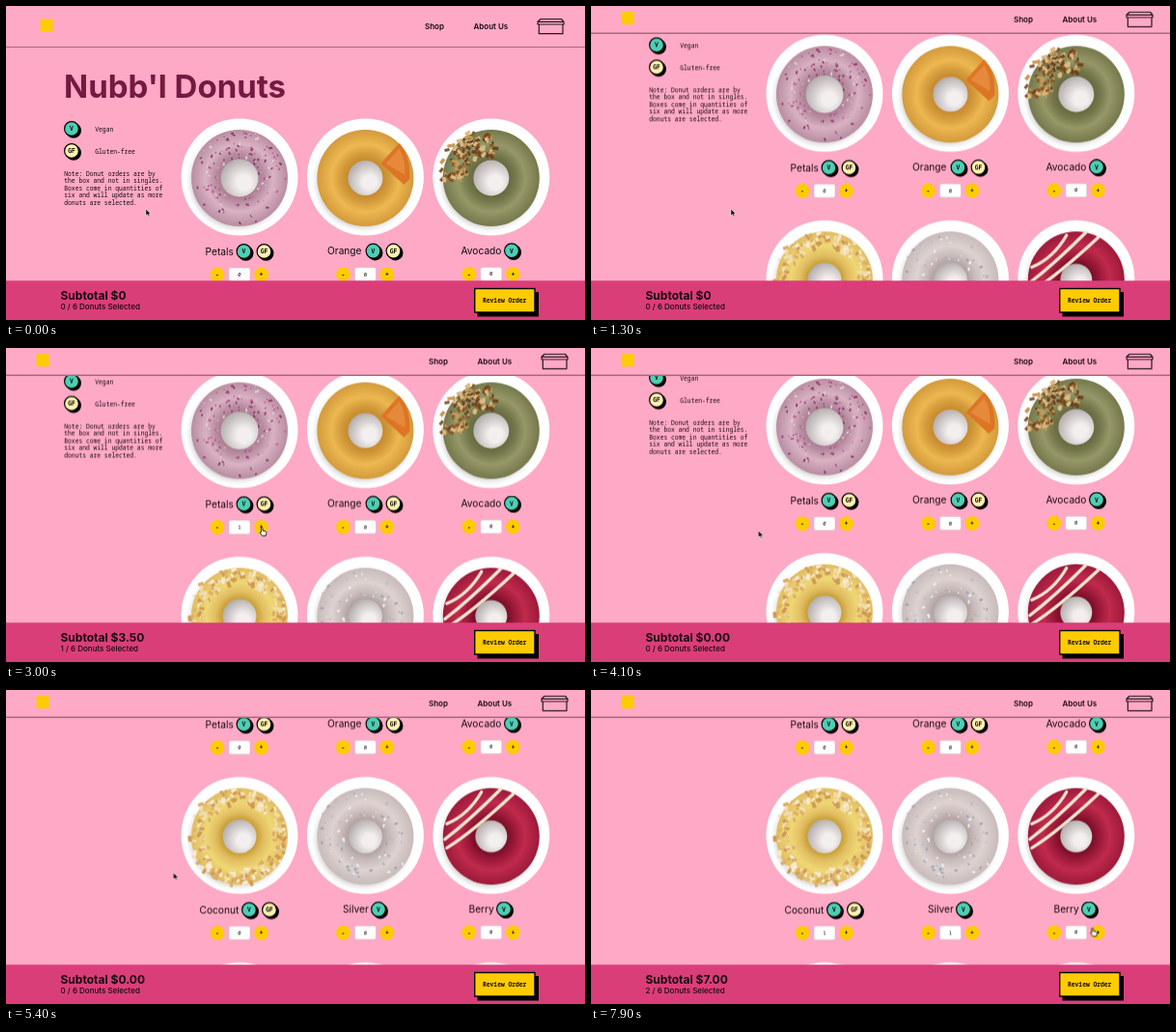
An HTML page that plays this animation: 600x325 px, repeating every 8 s.

```html
<!DOCTYPE html>
<html lang="en">
<head>
<meta charset="utf-8">
<title>Donut shop</title>
<style>
html, body { margin: 0; width: 100%; height: 100%; overflow: hidden; background: #fea9c5; }
svg { display: block; width: 100vw; height: 100vh; }
text { font-family: Inter, "Open Sans", sans-serif; fill: #17080f; }
.title { font: 700 33px Inter, sans-serif; fill: #741941; }
.nav { font-size: 8px; font-weight: 600; }
.name { font-size: 10.2px; }
.sum { font-size: 12px; font-weight: 650; }
.picked { font-size: 8px; font-weight: 500; }
.mono { font: 500 6.3px "Noto Sans Mono", "DejaVu Sans Mono", monospace; }
.bold { font-weight: 700; }
.mid { text-anchor: middle; }
.digit { font-size: 5.6px; }

.move { animation: 8s infinite both; }
#page { animation-name: scroll; }
#bar { animation-name: bar; }
#mark { animation-name: mark; }
#menu { animation-name: menu; }
#cursor { animation-name: cursor; animation-timing-function: ease-in-out; }
.show { animation: 8s step-end infinite both; }
.s0 { animation-name: s0; }
.s1 { animation-name: s1; }
.s2 { animation-name: s2; }
.s3 { animation-name: s3; }
.s4 { animation-name: s4; }
.hand { animation-name: hand; }
.arrow { animation-name: arrow; }

@keyframes scroll {
  0%, 2.5% { transform: translateY(0); animation-timing-function: cubic-bezier(.4, 0, .8, .8); }
  11.25% { transform: translateY(-45px); animation-timing-function: cubic-bezier(.2, .2, .5, 1); }
  18.75%, 50% { transform: translateY(-92.5px); animation-timing-function: cubic-bezier(.4, 0, .7, .9); }
  58.75% { transform: translateY(-192px); animation-timing-function: ease-out; }
  65%, 100% { transform: translateY(-218.5px); }
}
@keyframes bar { 0%, 3% { transform: none; } 7.5%, 100% { transform: translateY(-14.5px); } }
@keyframes mark { 0%, 3% { transform: none; } 7.5%, 100% { transform: translate(-4px, -7.5px); } }
@keyframes menu { 0%, 3% { transform: none; } 7.5%, 100% { transform: translate(4px, -7.2px); } }
@keyframes cursor {
  0%, 18.75% { transform: translate(145px, 210px); }
  22.5% { transform: translate(169.5px, 210.5px); }
  31.25%, 38.75% { transform: translate(265px, 186px); }
  43%, 46.25% { transform: translate(220px, 186px); }
  50%, 68.75% { transform: translate(173.5px, 189px); }
  75%, 81.25% { transform: translate(267.5px, 249px); }
  88.75%, 93.75% { transform: translate(397px, 249px); }
  98.5%, 100% { transform: translate(519.5px, 246.5px); }
}
@keyframes s0 { 0% { opacity: 1; } 33.75%, 100% { opacity: 0; } }
@keyframes s1 { 0% { opacity: 0; } 33.75% { opacity: 1; } 43.75%, 100% { opacity: 0; } }
@keyframes s2 { 0% { opacity: 0; } 43.75% { opacity: 1; } 76.25%, 100% { opacity: 0; } }
@keyframes s3 { 0% { opacity: 0; } 76.25% { opacity: 1; } 92.5%, 100% { opacity: 0; } }
@keyframes s4 { 0% { opacity: 0; } 92.5%, 100% { opacity: 1; } }
@keyframes hand {
  0%, 39.5%, 46.8%, 81.8%, 94.2% { opacity: 0; }
  30.5%, 42.3%, 74.5%, 88.2%, 97.8%, 100% { opacity: 1; }
}
@keyframes arrow {
  0%, 39.5%, 46.8%, 81.8%, 94.2% { opacity: 1; }
  30.5%, 42.3%, 74.5%, 88.2%, 97.8%, 100% { opacity: 0; }
}
</style>
</head>
<body>
<svg viewBox="0 0 600 325" preserveAspectRatio="none">
  <defs>
    <radialGradient id="shade">
      <stop offset=".8" stop-color="#b9b3b4"/>
      <stop offset="1" stop-color="#fff" stop-opacity="0"/>
    </radialGradient>
    <radialGradient id="hole" cx=".62" cy=".62" r=".65">
      <stop offset=".3" stop-color="#f3efee"/>
      <stop offset="1" stop-color="#b5aeae"/>
    </radialGradient>
  </defs>
  <rect width="600" height="325" fill="#fea9c5"/>

  <g id="page" class="move">
    <text class="title" x="60" y="94.5">Nubb'l Donuts</text>
    <g id="legend"></g>
    <g id="cards"></g>
  </g>

  <g id="bar" class="move">
    <rect y="-20" width="600" height="62.5" fill="#fea9c5"/>
    <rect y="42" width="600" height="1" fill="#a8697f"/>
  </g>
  <rect id="mark" class="move" x="35.5" y="13.5" width="13" height="13" fill="#fdcb00"/>
  <g id="menu" class="move">
    <text class="nav" x="434" y="23.8">Shop</text>
    <text class="nav" x="484.5" y="23.8">About Us</text>
    <path d="M554 13.5H575.5L578 16.3V19H551V16.3ZM551 16.3H578M552.3 19V28.7H577V19" fill="none" stroke="#2b1620" stroke-width="1.2" stroke-linejoin="round"/>
  </g>

  <rect y="284.3" width="600" height="41" fill="#da3e79"/>
  <g id="totals"></g>
  <rect x="488.5" y="296" width="63.5" height="25.5"/>
  <rect x="485.7" y="292.5" width="62.3" height="24.5" fill="#fdcb00" stroke="#000" stroke-width="1.4"/>
  <text class="mono bold mid" x="516.7" y="306.8">Review Order</text>

  <g id="cursor" class="move">
    <path class="show arrow" d="M0 0V7L1.6 5.6 2.7 8 3.9 7.5 2.8 5.2H4.8Z" stroke="#fff" stroke-width=".5"/>
    <path class="show hand" d="M-.6 .4Q.2-.8 1 .4V3L4.2 3.8Q5 4.2 4.8 5.5L4.2 8.4H.6L-1.8 5.2Q-1.8 4.2-.6 4.8Z" fill="#fff" stroke="#000" stroke-width=".8"/>
  </g>
</svg>

<script>
const get = id => document.getElementById(id);
const text = (x, y, cls, str) => `<text x="${x}" y="${y}" class="${cls}">${str}</text>`;
const circle = (x, y, r, fill, more = '') =>
  `<circle cx="${x}" cy="${y}" r="${r}" fill="${fill}" ${more}/>`;

const badge = (x, y, str) =>
  circle(x + 2, y + 1.8, 8, '#000') +
  circle(x, y, 7.4, str === 'V' ? '#4dcfb4' : '#fdf2ae', 'stroke="#000" stroke-width="1.2"') +
  text(x, y + 2.3, 'mono bold mid', str);

let seed = 7;
const rand = (a = 0, b = 1) => {
  seed = seed * 16807 % 2147483647;
  return a + (b - a) * seed / 2147483647;
};

// Loose crumbs inside a ring sector, angles in degrees
function crumbs({ n, colors, size, r = [21, 49], arc = [0, 360] }) {
  let out = '';
  for (let i = 0; i < n; i++) {
    const a = rand(...arc) * Math.PI / 180, d = rand(...r), s = rand(...size);
    const x = Math.cos(a) * d, y = Math.sin(a) * d;
    out += `<rect width="${s.toFixed(1)}" height="${(s * .6).toFixed(1)}" fill="${colors[i % colors.length]}"
      transform="translate(${x.toFixed(1)} ${y.toFixed(1)}) rotate(${rand(0, 180).toFixed()})"/>`;
  }
  return out;
}

const donuts = [
  { name: 'Petals', x: 206.5, v: 246.5, gf: 267.5, tones: ['#a9798f', '#d9b2c3', '#b98da2'], hole: 19.5,
    crumbs: { n: 130, colors: ['#9c3a74', '#c05a92', '#e6cfd2', '#84405f'], size: [1, 3.4] }, ones: ['s1'] },
  { name: 'Orange', x: 333, v: 380.5, gf: 401.5, tones: ['#c78a2e', '#edb851', '#d39a3b'], hole: 18,
    extra: '<path d="M16-15L35-36Q47-24 46 1L40 7Z" fill="#dd7426"/><path d="M21-15L35-30Q42-20 41-3Z" fill="#e58a3a"/>' },
  { name: 'Avocado', x: 471.5, v: 524, tones: ['#666940', '#969868', '#75784b'], hole: 18.5,
    crumbs: { n: 120, colors: ['#8a5a2a', '#c99a58', '#6e4420', '#dcb983'], size: [3, 6], r: [25, 52], arc: [178, 276] } },
  { name: 'Coconut', x: 200.5, v: 252, gf: 273, tones: ['#c9a037', '#efd774', '#e2bd62'], hole: 17.5,
    crumbs: { n: 190, colors: ['#f2dcae', '#dcae69', '#f7ead0', '#cf9a55'], size: [3, 6.5], r: [36, 50] }, ones: ['s3', 's4'] },
  { name: 'Silver', x: 349, v: 386, tones: ['#b3a4a3', '#ded3d1', '#c8bbba'], hole: 17.5,
    crumbs: { n: 75, colors: ['#9fa3b2', '#f4f2f4', '#b9bccb'], size: [1.5, 3.6] }, ones: ['s4'] },
  { name: 'Berry', x: 479.5, v: 516, tones: ['#7d1029', '#c02a4d', '#9d1a3a'], hole: 16.5,
    extra: '<path d="M-46-13Q-24-22-10-46M-48 3Q-22-17 10-49M-46 12Q-20-4 23-44" fill="none" stroke="#f7e6cf" stroke-width="3.2" stroke-linecap="round"/>' }
];

function photo(d, i) {
  const [rim, light, edge] = d.tones;
  return `<radialGradient id="tone${i}">
      <stop offset=".36" stop-color="${rim}"/><stop offset=".5" stop-color="${edge}"/>
      <stop offset=".7" stop-color="${light}"/><stop offset="1" stop-color="${edge}"/>
    </radialGradient>` +
    circle(-2, 3, 55, 'url(#shade)') + circle(0, 0, 50, `url(#tone${i})`) +
    (d.crumbs ? crumbs(d.crumbs) : '') + (d.extra || '') +
    circle(0, 0, d.hole, 'url(#hole)');
}

const button = (x, y, sign) => circle(x, y, 7.4, '#fdcb00') + text(x, y + 2.2, 'mono bold mid', sign);
const field = (x, y, n) =>
  `<rect x="${x - 11}" y="${y - 7}" width="22" height="14" rx="2" fill="#fff" stroke="#d9b9c5" stroke-width=".6"/>` +
  text(x, y + 2, 'mono digit mid', n);

function card(d, i) {
  const col = i % 3, top = Math.floor(i / 3) * 192;
  const x = 242 + col * 130.4, y = top + 254 - col * .4, tools = top + 278 - col * .3;
  return circle(x, top + 177, 60.5, '#fff') +
    `<g transform="translate(${x} ${top + 178})">${photo(d, i)}</g>` +
    text(d.x, y + 3.6, 'name', d.name) + badge(d.v, y, 'V') + (d.gf ? badge(d.gf, y, 'GF') : '') +
    button(x - 23, tools, '-') + button(x + 22.5, tools, '+') + field(x, tools, 0) +
    (d.ones || []).map(s => `<g class="show ${s}">${field(x, tools, 1)}</g>`).join('');
}

const note = ['Note: Donut orders are by', 'the box and not in singles.', 'Boxes come in quantities of',
  'six and will update as more', 'donuts are selected.'];

get('legend').innerHTML =
  badge(68, 127, 'V') + text(92.3, 129.8, 'mono', 'Vegan') +
  badge(68, 150, 'GF') + text(92.3, 152.6, 'mono', 'Gluten-free') +
  note.map((line, i) => text(60.3, 175.5 + i * 7.5, 'mono', line)).join('');

get('cards').innerHTML = donuts.map(card).join('') +
  [0, 1, 2].map(i => circle(242 + i * 130.4, 561, 60.5, '#fff')).join('');

get('totals').innerHTML = [['$0', 0], ['$3.50', 1], ['$0.00', 0], ['$3.50', 1], ['$7.00', 2]]
  .map(([sum, n], i) => `<g class="show s${i}">` + text(56.5, 304, 'sum', 'Subtotal ' + sum) +
    text(56.5, 314, 'picked', n + ' / 6 Donuts Selected') + '</g>').join('');
</script>
</body>
</html>
```
